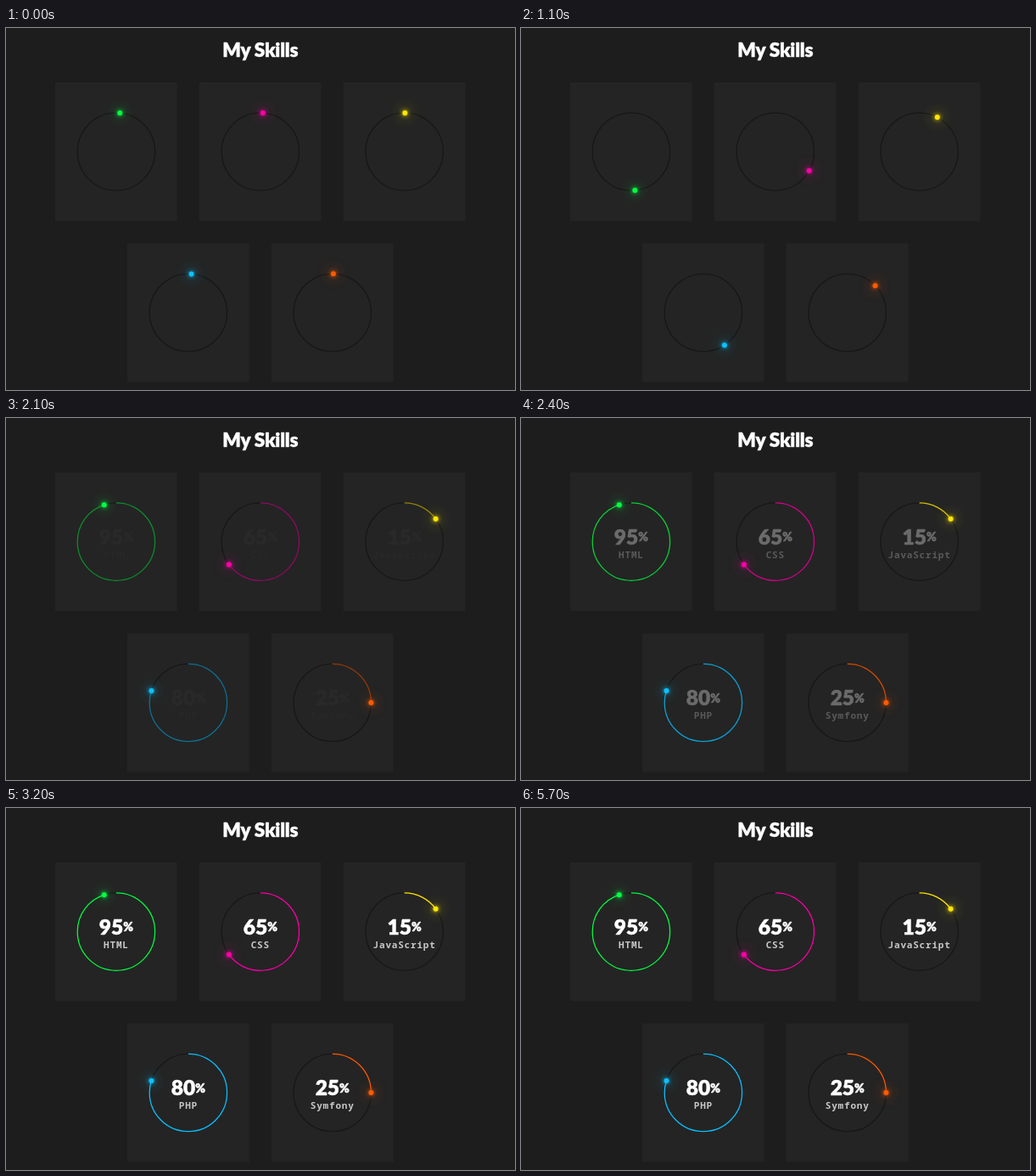
Write an HTML page that moves like this. It is 600x426 px and loops after 5800 ms.

```html
<!DOCTYPE html>
<html lang="en">
<head>
<meta charset="utf-8">
<title>My Skills</title>
<style>
html, body { margin: 0; width: 100%; height: 100%; overflow: hidden; background: #1d1d1d; }
#stage { position: relative; width: 600px; height: 426px; overflow: hidden; }
svg { position: absolute; inset: 0; display: block; }
text { text-anchor: middle; stroke-linejoin: round; }
.title, .num { font-family: Lato, "Open Sans", sans-serif; font-weight: 900; fill: #fff; stroke: #fff; stroke-width: .5; }
.title { font-size: 22.5px; letter-spacing: -.2px; }
.num { font-size: 24.5px; }
.num tspan { font-size: 14px; }
.label { font: 600 11px "Noto Sans Mono", "DejaVu Sans Mono", monospace; letter-spacing: .8px; fill: #fff; fill-opacity: .75; }
.card { fill: #242424; }
.track, .arc { fill: none; stroke-width: 1.3; }
.track { stroke: #171717; }
.dot { position: absolute; left: -3.4px; top: -3.4px; width: 6.8px; height: 6.8px; border-radius: 50%; }
</style>
</head>
<body>
<div id="stage">
  <svg width="600" height="426" viewBox="0 0 600 426">
    <text class="title" x="299.8" y="33.5">My Skills</text>
  </svg>
</div>
<script>
const LOOP = 5800, STEP = 100, SWEEP = 2000, R = 45.7;
const skills = [
  { name: "HTML", pct: 95, color: "#04fc43", x: 129.9, y: 145.6 },
  { name: "CSS", pct: 65, color: "#fe00a8", x: 299.8, y: 145.6 },
  { name: "JavaScript", pct: 15, color: "#ffe600", x: 469.6, y: 145.6 },
  { name: "PHP", pct: 80, color: "#0cc0ff", x: 214.9, y: 335 },
  { name: "Symfony", pct: 25, color: "#ff5a00", x: 384.7, y: 335 }
];
const stage = document.getElementById("stage");
const svg = stage.querySelector("svg");

function add(parent, tag, attrs, text) {
  const el = document.createElementNS("http://www.w3.org/2000/svg", tag);
  for (const key in attrs) el.setAttribute(key, attrs[key]);
  if (text) el.textContent = text;
  parent.appendChild(el);
  return el;
}

for (const s of skills) {
  const { x, y } = s;
  const ring = { cx: x, cy: y, r: R };
  add(svg, "rect", { class: "card", x: x - 72, y: y - 81.6, width: 143.8, height: 163.2 });
  add(svg, "circle", { class: "track", ...ring });
  s.arc = add(svg, "circle", {
    class: "arc", ...ring, stroke: s.color, pathLength: 100,
    "stroke-dasharray": `${s.pct} 100`, transform: `rotate(-90 ${x} ${y})`
  });
  s.info = add(svg, "g", {});
  const num = add(s.info, "text", { class: "num", x: x, y: y + 3.4 }, String(s.pct));
  add(num, "tspan", { dy: -3.6 }, "%");
  add(s.info, "text", { class: "label", x: x, y: y + 19.2 }, s.name);

  s.dot = document.createElement("div");
  s.dot.className = "dot";
  s.dot.style.background = s.color;
  s.dot.style.boxShadow = `0 0 5px ${s.color}, 0 0 15px ${s.color}`;
  stage.appendChild(s.dot);
}

const clamp = v => Math.min(1, Math.max(0, v));
const fade = (time, delay) => clamp((time - delay) / 1000);

// The sweep starts slightly slowed, then runs at a steady pace.
const progress = t => t < 200 ? 32 + t * .44 : t - 80;

function draw(now) {
  const t = Math.floor((now % LOOP) / STEP) * STEP;
  const p = progress(t);
  for (const s of skills) {
    const angle = clamp(p / SWEEP) * s.pct / 100 * 2 * Math.PI;
    const dx = s.x + R * Math.sin(angle), dy = s.y - R * Math.cos(angle);
    s.dot.style.transform = `translate(${dx}px, ${dy}px)`;
    s.arc.style.opacity = fade(p, 1500);
    s.info.style.opacity = fade(p, 2000);
  }
}

const start = performance.now();
function tick() {
  draw(performance.now() - start);
  requestAnimationFrame(tick);
}
tick();
</script>
</body>
</html>
```
